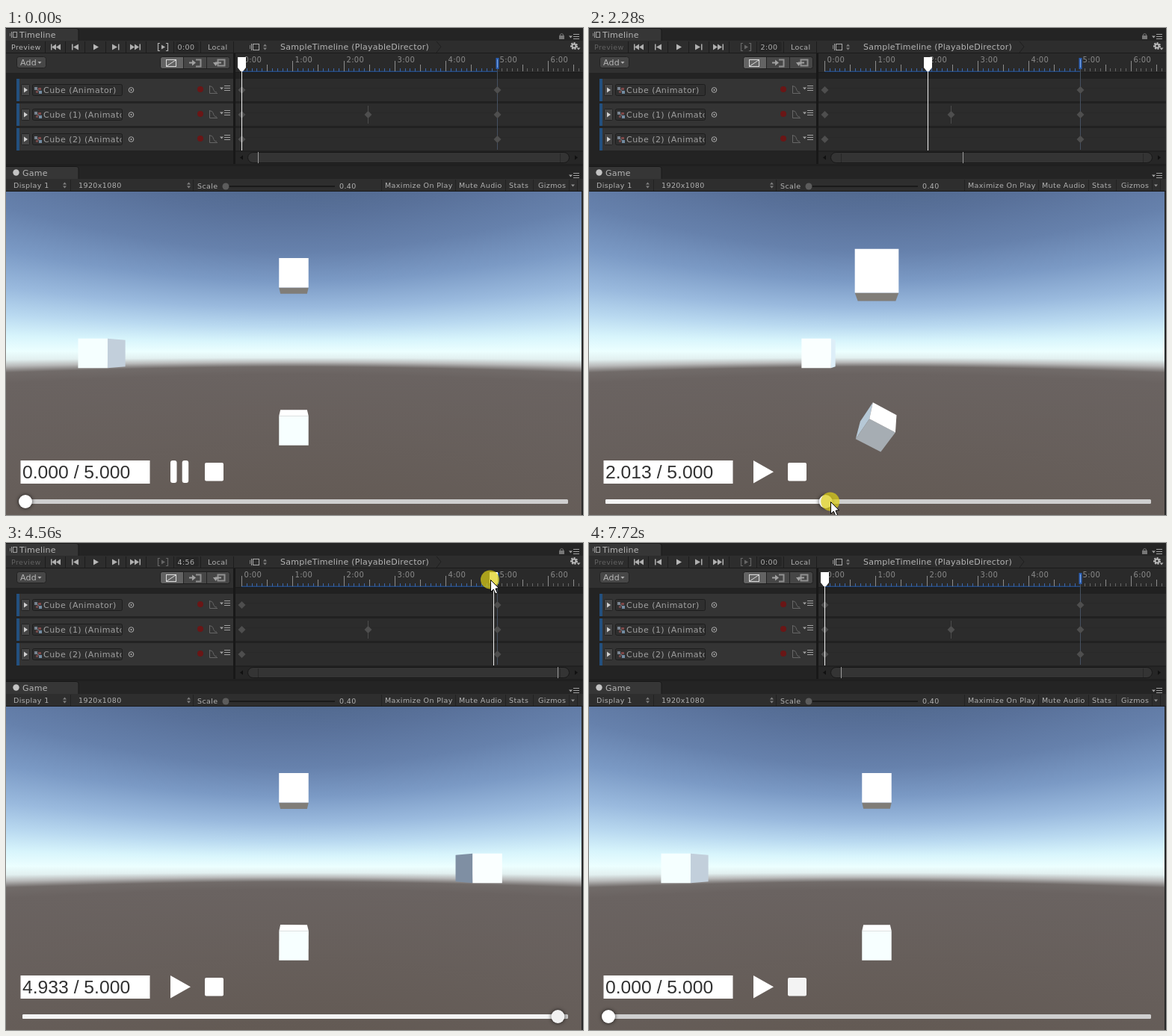
Write an HTML page with a canvas that moves like this. It is 772 by 652 pixels and loops after 8520 ms.

```html
<!DOCTYPE html>
<html lang="en">
<head>
<meta charset="utf-8">
<title>Timeline scrubbing</title>
<style>
html, body { margin: 0; width: 100%; height: 100%; overflow: hidden; background: #282828; }
canvas { display: block; }
</style>
</head>
<body>
<canvas id="stage" width="772" height="652"></canvas>
<script>
const W = 772, H = 652, LOOP = 8520, STEP = 40;
const VIEW_W = 770, VIEW_TOP = 219, CX = 385, CY = 435.5, FOCAL = 375;
const UI_FONT = '"DejaVu Sans", sans-serif';
const ROWS = [83, 116, 149];

let g;
const screen = document.getElementById('stage').getContext('2d');

// ---------- drawing helpers ----------
function rect(x, y, w, h, color) {
  g.fillStyle = color;
  g.fillRect(x, y, w, h);
}
function poly(points, color) {
  g.fillStyle = color;
  g.beginPath();
  points.forEach(([x, y]) => g.lineTo(x, y));
  g.closePath();
  g.fill();
}
function round(x, y, w, h, r, fill, stroke) {
  g.beginPath();
  g.roundRect(x, y, w, h, r);
  if (fill) { g.fillStyle = fill; g.fill(); }
  if (stroke) { g.strokeStyle = stroke; g.lineWidth = 1; g.stroke(); }
}
function disc(x, y, r, color) {
  g.fillStyle = color;
  g.beginPath();
  g.arc(x, y, r, 0, Math.PI * 2);
  g.fill();
}
function line(x1, y1, x2, y2, color, width = 1) {
  g.strokeStyle = color;
  g.lineWidth = width;
  g.beginPath();
  g.moveTo(x1, y1);
  g.lineTo(x2, y2);
  g.stroke();
}
function text(str, x, y, color = '#b2b2b2', size = 11, spacing = 0.25) {
  g.font = size + 'px ' + UI_FONT;
  g.letterSpacing = spacing + 'px';
  g.fillStyle = color;
  g.fillText(str, x, y);
  g.letterSpacing = '0px';
}
const small = (str, x, y, color) => text(str, x, y, color, 9.5, 0.4);
const right = (x, y, w, h, color) => poly([[x, y - h], [x + w, y], [x, y + h]], color);
const down = (x, y, color) => poly([[x - 2.5, y - 1.5], [x + 2.5, y - 1.5], [x, y + 1.5]], color);
function upDown(x, y) {
  poly([[x - 2.5, y - 1], [x + 2.5, y - 1], [x, y - 4]], '#808080');
  poly([[x - 2.5, y + 1], [x + 2.5, y + 1], [x, y + 4]], '#808080');
}
function menu(x, y, color = '#a0a0a0') {
  down(x + 2.5, y, color);
  for (let i = -1; i < 2; i++) rect(x + 6, y + i * 3 - 1, 8, 1, color);
}

// ---------- static editor panels ----------
const rulerX = s => 315.5 + s * 68.3;

function drawTab(y, h, label) {
  rect(0, y, W, h, '#242424');
  round(-4, y + 0.5, 101, h + 3, 3, '#363636', '#191919');
  text(label, label === 'Game' ? 22 : 18, y + h - 4, '#b4b4b4');
}

function drawTransport() {
  const c = '#b0b0b0';
  for (const x of [52, 79, 105, 133, 160, 187, 224, 260, 304]) rect(x, 18, 1, 15, '#1d1d1d');
  const left = (x, w) => right(x, 25.5, -w, 4, c);
  rect(60, 21.5, 1.5, 8, c); left(67, 6); left(73, 6);
  rect(88, 21.5, 1.5, 8, c); left(97, 7);
  right(142, 25.5, 7, 4, c); rect(150, 21.5, 1.5, 8, c);
  right(166, 25.5, 6, 4, c); right(172, 25.5, 6, 4, c); rect(178.5, 21.5, 1.5, 8, c);
  small('Local', 270, 29);
  g.strokeStyle = '#a8a8a8';
  g.lineWidth = 1;
  g.strokeRect(330.5, 21.5, 8, 8);
  line(328.5, 21, 328.5, 30, '#a8a8a8');
  line(326.5, 23, 326.5, 28, '#808080');
  upDown(346.5, 25.5);
  text('SampleTimeline (PlayableDirector)', 367, 29, '#b4b4b4');
  g.strokeStyle = '#1f1f1f';
  g.beginPath();
  g.moveTo(576, 18); g.lineTo(582, 25); g.lineTo(576, 33);
  g.stroke();
  g.setLineDash([2, 1.6]);
  g.strokeStyle = '#b8b8b8';
  g.lineWidth = 2;
  g.beginPath(); g.arc(760, 24, 4, 0, 7); g.stroke();
  g.setLineDash([]);
  disc(760, 24, 3.6, '#b8b8b8');
  disc(760, 24, 1.5, '#2d2d2d');
  down(766, 28, '#b0b0b0');
}

function drawOptions() {
  round(14.5, 38.5, 39, 15, 3, '#474747', '#222');
  text('Add', 19, 50, '#b6b6b6');
  down(45, 46.5, '#b0b0b0');
  round(206.5, 38.5, 93, 16, 3, '#464646', '#1e1e1e');
  round(207, 39, 30, 15, [3, 0, 0, 3], '#636363');
  rect(237, 39, 1, 15, '#222');
  rect(268, 39, 1, 15, '#222');
  g.strokeStyle = '#ddd';
  g.lineWidth = 1;
  g.strokeRect(214.5, 42.5, 13, 9);
  line(215, 51, 227, 43, '#ddd');
  line(245, 46.5, 250, 46.5, '#a0a0a0', 2);
  right(249, 46.5, 5, 4, '#a0a0a0');
  g.strokeStyle = '#909090';
  g.beginPath();
  g.moveTo(254, 42.5); g.lineTo(260.5, 42.5); g.lineTo(260.5, 51.5); g.lineTo(254, 51.5);
  g.stroke();
  g.strokeRect(283.5, 42.5, 9, 8);
  line(280, 46.5, 288, 46.5, '#a0a0a0', 2);
  poly([[277, 46], [284, 46], [280.5, 51]], '#a0a0a0');
}

function drawTrack(y, label) {
  rect(14, y - 15, 290, 30, '#343434');
  rect(14, y - 15, 4, 30, '#23507f');
  rect(307, y - 15, W - 307, 30, '#2c2c2c');
  rect(307, y - 3, W - 307, 1, '#292929');
  round(20.5, y - 7.5, 11, 15, 1, '#454545', '#222');
  right(24, y, 5, 3.5, '#d0d0d0');
  round(35.5, y - 7.5, 120, 15, 2, '#2f2f2f', '#1d1d1d');
  rect(38, y - 4, 4, 4, '#75808c');
  rect(43, y - 3, 4, 3, '#7d4747');
  rect(40, y + 1, 3, 3, '#704848');
  rect(44, y + 1, 4, 4, '#6f8ba3');
  line(39, y - 3, 47, y + 4, '#7f8c99');
  g.save();
  g.beginPath();
  g.rect(36, y - 8, 118.5, 16);
  g.clip();
  text(label, 50, y + 4, '#a0a0a0', 11, 0.45);
  g.restore();
  g.strokeStyle = '#b0b0b0';
  g.lineWidth = 1;
  g.beginPath(); g.arc(167.5, y, 3.3, 0, 7); g.stroke();
  disc(167.5, y, 1.1, '#b0b0b0');
  disc(260, y - 1, 4, '#6a1616');
  g.strokeStyle = '#666';
  g.beginPath();
  g.moveTo(272.5, y - 6); g.lineTo(272.5, y + 4.5); g.lineTo(283, y + 4.5);
  g.moveTo(273, y - 5);
  g.bezierCurveTo(279, y - 5, 276, y + 3, 282, y + 3);
  g.stroke();
  menu(286, y - 2);
}

function drawRuler() {
  rect(307, 34, W - 307, 26, '#2a2a2a');
  rect(307, 59, W - 307, 1, '#1b1b1b');
  rect(315, 57.5, 342, 1.5, '#254a80');
  for (let i = 0; i <= 66; i++) {
    const x = Math.floor(rulerX(i / 10)) + 0.5;
    if (x > 768) break;
    const top = i % 10 === 0 ? 44 : i % 5 === 0 ? 49 : 54;
    line(x, top, x, 58, i % 5 === 0 ? '#8c8c8c' : i < 50 ? '#3c67ab' : '#666');
    if (i % 10 === 0) text(i / 10 + ':00', x + 3, 45.5, '#8a8a8a', 10, 0.3);
  }
}

function drawKeys() {
  const end = Math.floor(rulerX(5)) + 0.5;
  line(end, 55, end, 163, '#465160');
  line(484.5, 104, 484.5, 128, '#4c4c4c');
  const key = (x, y) => poly([[x, y - 5], [x + 5, y], [x, y + 5], [x - 5, y]], '#4e4e4e');
  for (const y of ROWS) { key(315.5, y); key(end, y); }
  key(484.5, ROWS[1]);
  rect(655.5, 40, 4, 15, '#2a5fb4');
  rect(657, 42, 1, 11, '#7fa5dd');
}

function drawPanels() {
  rect(0, 0, W, H, '#282828');
  drawTab(0, 17, 'Timeline');
  g.strokeStyle = '#a0a0a0';
  g.lineWidth = 1;
  g.strokeRect(9.5, 5.5, 5, 7);
  line(7.5, 5, 7.5, 13, '#a0a0a0');
  line(5.5, 7, 5.5, 11, '#808080');
  round(740, 10, 7, 5, 0.5, '#777');
  g.strokeStyle = '#777';
  g.beginPath(); g.arc(743.5, 10, 2.3, Math.PI, 0); g.stroke();
  menu(753, 12);
  rect(0, 17, W, 17, '#2d2d2d');
  rect(0, 33, W, 1, '#1b1b1b');
  rect(0, 34, 304, 26, '#303030');
  rect(0, 60, 304, 122, '#232323');
  rect(307, 60, W - 307, 122, '#212121');
  drawTransport();
  drawOptions();
  drawRuler();
  ['Cube (Animator)', 'Cube (1) (Animator)', 'Cube (2) (Animator)'].forEach((s, i) => drawTrack(ROWS[i], s));
  drawKeys();
  rect(304, 34, 3, 148, '#181818');
  rect(307, 166, W - 307, 16, '#262626');
  round(323.5, 166.5, 430, 14, 7, '#343434', '#171717');
  line(337.5, 168, 337.5, 180, '#272727');
  line(741.5, 168, 741.5, 180, '#272727');
  right(317, 173.5, -4, 3, '#101010');
  right(761, 173.5, 4, 3, '#101010');

  rect(0, 182, W, 4, '#1f1f1f');
  drawTab(185, 17, 'Game');
  disc(13.5, 193.5, 4.2, '#c4c4c4');
  menu(753, 198);
  rect(0, 202, W, 17, '#2e2e2e');
  rect(0, 218, W, 1, '#191919');
  for (const x of [86, 250, 502, 601, 668, 705, 753, 764]) rect(x, 203, 1, 15, '#222');
  small('Display 1', 10, 214);
  upDown(78.5, 210.5);
  small('1920x1080', 97, 214);
  upDown(244.5, 210.5);
  small('Scale', 256, 215);
  rect(290, 211, 150, 2, '#1a1a1a');
  disc(294, 212, 4.5, '#5c5c5c');
  small('0.40', 446, 215);
  small('Maximize On Play', 507, 214);
  small('Mute Audio', 606, 214);
  small('Stats', 673, 214);
  small('Gizmos', 712, 214);
  down(758.5, 211, '#909090');
}

// Sky bands follow elevation angle, so each column is scaled about the horizon.
function drawSky() {
  const stops = [
    [-216.5, '#526a90'], [-186, '#59719a'], [-136, '#6681ac'], [-96, '#7b9ac5'],
    [-61, '#9abade'], [-36, '#b9d9f0'], [-16, '#d8f5fc'], [-2, '#ecffff'],
    [6, '#e2f0f0'], [12, '#b8b9b9'], [18, '#716b69'], [28, '#6a6361'], [216.5, '#635a54']
  ];
  for (let x = 0; x < VIEW_W; x++) {
    const k = Math.hypot(FOCAL, x + 0.5 - CX) / FOCAL;
    const grad = g.createLinearGradient(0, CY - 216.5 * k, 0, CY + 216.5 * k);
    for (const [d, c] of stops) grad.addColorStop((d + 216.5) / 433, c);
    rect(x, VIEW_TOP, 1, H - VIEW_TOP, grad);
  }
}

// ---------- cubes ----------
const dot = (a, b) => a[0] * b[0] + a[1] * b[1] + a[2] * b[2];
const unit = a => { const n = Math.hypot(...a); return a.map(c => c / n); };
const LIGHT = [0.32, 0.766, -0.557];

// Rotates about z, then x, then y by the same angle.
function spin([x, y, z], a) {
  const c = Math.cos(a), s = Math.sin(a);
  [x, y] = [x * c - y * s, x * s + y * c];
  [y, z] = [y * c - z * s, y * s + z * c];
  return [x * c + z * s, y, z * c - x * s];
}

function shade(n, v) {
  const lit = Math.max(0, dot(n, LIGHT));
  const low = Math.max(0, -n[1]);
  const fresnel = Math.pow(1 - dot(n, v), 5) * (1 - low);
  const half = unit(LIGHT.map((l, i) => l + v[i]));
  const spec = lit > 0 ? 25 * Math.pow(Math.max(0, dot(n, half)), 8) : 0;
  const side = [125, 141, 161], under = [128, 125, 120];
  const sun = [211, 202, 177], rim = [65, 75, 70];
  const rgb = side.map((c, i) =>
    Math.min(255, Math.round(c + (under[i] - c) * low + sun[i] * lit + rim[i] * fresnel + spec)));
  return `rgb(${rgb})`;
}

function cube(pos, size, angle) {
  for (let axis = 0; axis < 3; axis++) for (const sign of [-1, 1]) {
    const place = (u, w) => {
      const p = [0, 0, 0];
      p[axis] = sign;
      p[(axis + 1) % 3] = u;
      p[(axis + 2) % 3] = w;
      return spin(p, angle).map((c, i) => c * size / 2 + pos[i]);
    };
    const center = place(0, 0);
    const n = unit(center.map((c, i) => c - pos[i]));
    const view = unit([-center[0], -center[1], -10 - center[2]]);
    if (dot(n, view) <= 0) continue;
    const corners = [[-1, -1], [1, -1], [1, 1], [-1, 1]].map(([u, w]) => {
      const [x, y, z] = place(u, w), k = FOCAL / (10 + z);
      return [CX + x * k, CY - y * k];
    });
    poly(corners, shade(n, view));
  }
}

// ---------- motion ----------
const clamp = x => Math.min(1, Math.max(0, x));
const ease = x => { x = clamp(x); return x * x * (3 - 2 * x); };
const PAUSED = 1.594, SCRUBBED = 1.598, DRAGGED = 1 + 8 / 60;
const DRAGS = [
  [2108, 2780, PAUSED, 4.166], [2780, 3320, 4.166, SCRUBBED],
  [3960, 4580, SCRUBBED, 4.96], [4580, 5080, 4.96, DRAGGED]
];
const PATH = [
  [400, 774, 440], [800, 480, 545], [1040, 428, 566], [1600, 232, 594], [1780, 232, 594],
  [2080, 262, 634], [3340, 265, 634], [3840, 419, 49], [5080, 388, 49], [5240, 370, 181],
  [5780, 232, 594], [6000, 234, 594], [6520, 279, 594], [6600, 280, 594], [7600, 280, 594]
];
const within = (t, a, b) => t >= a && t < b;
const isPlaying = t => within(t, 160, 1720) || within(t, 5880, 7000);
const onSlider = t => within(t, 2108, 3320);
const onRuler = t => within(t, 3960, 5080);

function timeAt(t) {
  if (t < 160 || t >= 7000) return 0;
  if (t < 1720) return (t - 106) / 1000;
  if (t >= 5880) return 1.88 + (t - 6600) / 1000;
  let v = PAUSED;
  for (const [a, b, from, to] of DRAGS) if (t >= a) v = from + (to - from) * ease((t - a) / (b - a));
  return onRuler(t) ? Math.floor(v * 60 + 1e-6) / 60 : v;
}

function cursorAt(t, knob, head) {
  if (onSlider(t)) return [knob + 6, 634];
  if (onRuler(t)) return [head - 5, 49];
  const i = PATH.findIndex(p => p[0] > t);
  if (i < 1) return null;
  const [a, b] = [PATH[i - 1], PATH[i]];
  const k = ease((t - a[0]) / (b[0] - a[0]));
  return [a[1] + (b[1] - a[1]) * k, a[2] + (b[2] - a[2]) * k];
}

function drawCursor([x, y]) {
  g.save();
  g.translate(Math.round(x) + 0.5, Math.round(y) + 0.5);
  const arrow = [[0, 0], [0, 16], [3.8, 12.6], [6.4, 18.6], [9, 17.4], [6.5, 11.6], [11, 11.2]];
  const resize = [[0, -11], [4.5, -6], [1, -6], [1, 6], [4.5, 6], [0, 11], [-4.5, 6], [-1, 6], [-1, -6], [-4.5, -6]];
  g.lineJoin = 'round';
  poly(within(y, 176, 187) ? resize : arrow, '#fff');
  g.strokeStyle = '#000';
  g.lineWidth = 1;
  g.stroke();
  g.restore();
}

// ---------- frame ----------
function drawEditorState(t, now, head, playing) {
  const idle = t < 160;
  if (playing) rect(106, 18, 27, 15, '#484848');
  small('Preview', 7, 29, idle ? '#b6b6b6' : '#626262');
  right(117, 25.5, 7, 4, '#b8b8b8');
  const c = idle ? '#b0b0b0' : '#666';
  g.strokeStyle = c;
  g.lineWidth = 1.2;
  g.beginPath();
  g.moveTo(206, 20.5); g.lineTo(203.5, 20.5); g.lineTo(203.5, 30.5); g.lineTo(206, 30.5);
  g.moveTo(214, 20.5); g.lineTo(216.5, 20.5); g.lineTo(216.5, 30.5); g.lineTo(214, 30.5);
  g.stroke();
  right(208, 25.5, 5, 3, c);
  const frames = Math.floor(now * 60 + 1e-6);
  round(227.5, 18.5, 30, 13, 2, '#262626');
  small(Math.floor(frames / 60) + ':' + String(frames % 60).padStart(2, '0'), 229.5, 28.5);
  line(head, 55, head, 164, '#f0f0f0');
  poly([[head - 5.5, 39], [head + 5.5, 39], [head + 5.5, 53], [head + 1.5, 58], [head - 1.5, 58], [head - 5.5, 53]], '#fff');
  const tick = Math.floor(337 + now * 81.3) + 0.5;
  line(tick, 166, tick, 181, '#9c9c9c');
}

function drawControls(t, v, knob) {
  rect(19.5, 579, 173, 31, '#fff');
  g.font = '24.7px "Liberation Sans", Arial, sans-serif';
  g.fillStyle = '#323232';
  g.fillText(v.toFixed(3) + ' / 5.000', 22, 603);
  if (t < 160 || isPlaying(t)) {
    round(220, 579, 8.5, 30, 3, '#fff');
    round(235.7, 579, 8.5, 30, 3, '#fff');
  } else {
    poly([[220, 579], [247, 594.3], [220, 609.5]], '#fff');
  }
  round(266, 582, 25, 24.5, 2, t >= 6480 ? '#f3f3f3' : '#fff');
  round(22, 631, 730, 6, 1.5, '#cfcfcf');
  round(22, 631, knob - 22, 6, 1.5, '#f4f4f4');
  g.save();
  g.shadowColor = 'rgba(0,0,0,.75)';
  g.shadowBlur = 5;
  disc(knob, 634, 9, within(t, 2108, 5880) ? '#f1f1f1' : '#fff');
  g.restore();
}

function draw(t) {
  const v = timeAt(t), playing = isPlaying(t);
  const now = v + (playing ? 0.034 : 0);
  const head = Math.floor(rulerX(now)) + 0.5, knob = 26 + v * 144.4;
  g.drawImage(backdrop, 0, 0);
  drawEditorState(t, now, head, playing);

  const slide = ease(now / 5);
  const pulse = ease(now < 2.5 ? now / 2.5 : (5 - now) / 2.5);
  cube([-6.81 + 13.38 * slide, 0, 0], 1, 0);
  cube([0, 2.73, 0], 1 + pulse / 2, 0);
  cube([0, -2.62, 0], 1, slide * Math.PI * 2);
  drawControls(t, v, knob);

  const cursor = cursorAt(t, knob, head);
  if (!cursor) return;
  const pressed = onSlider(t) || onRuler(t) ||
    within(t, 1680, 1800) || within(t, 5840, 5960) || within(t, 6960, 7080);
  if (pressed) disc(cursor[0], cursor[1], 12.5, 'rgba(222,208,24,.72)');
  drawCursor(cursor);
}

const backdrop = document.createElement('canvas');
backdrop.width = W;
backdrop.height = H;
g = backdrop.getContext('2d');
drawPanels();
drawSky();
g = screen;

const start = performance.now();
function tick() {
  const t = (performance.now() - start) % LOOP;
  draw(Math.floor(t / STEP) * STEP);
  requestAnimationFrame(tick);
}
tick();
</script>
</body>
</html>
```
